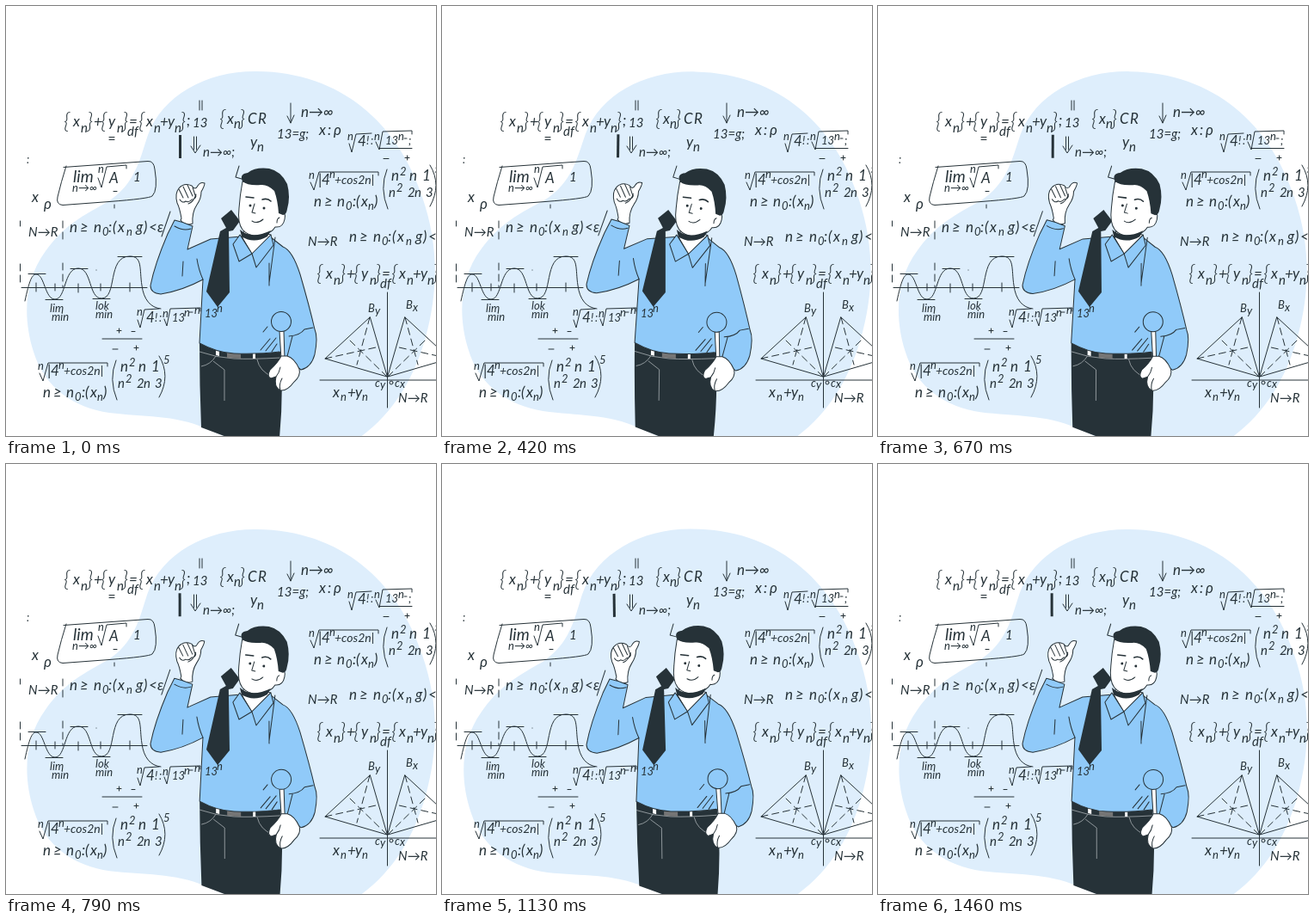
Write an HTML page that moves like this. It is 500 px wide and 500 px high and loops after 1500 ms.

```html
<!DOCTYPE html>
<html lang="en">
<head>
<meta charset="utf-8">
<title>Math teacher</title>
<style>
html, body { margin: 0; height: 100%; overflow: hidden; background: #fff; }
svg { display: block; width: 100vw; height: 100vh; }
.board { font: italic 17px Lato, "DejaVu Sans", sans-serif; fill: #263238; }
.board .m { font-size: 15px; }
.board .s { font-size: 13px; }
.board .xs { font-size: 11px; }
.board .b { font-size: 26px; font-weight: 300; }
.line, .board path { fill: none; stroke: #263238; stroke-linecap: round; stroke-linejoin: round; }
.board .dash { stroke-dasharray: 8 5; }
.skin, .shirt { fill: #fff; stroke: #263238; stroke-linejoin: round; }
.shirt { fill: #90caf9; }
.dark { fill: #263238; }
.seam { fill: none; stroke: #a9b0b3; stroke-width: .8; }
</style>
</head>
<body>
<svg viewBox="0 0 500 500">
  <path id="blob" fill="#deeefc" d="M292 76C235 75 182 103 165 150C155 180 150 207 118 228C82 247 64 260 46 285C20 320 20 365 32 402C45 445 80 467 120 473C160 478 195 475 232 491L262 504H408C448 477 474 435 488 385C503 330 503 277 484 222C456 137 390 77 292 76Z"/>

  <g id="man">
    <path class="dark" d="M225 392Q245 403 265 404Q295 405 319 402Q323 450 318 502H259L227 490Q225 440 225 392Z"/>
    <path class="seam" d="M225 402Q245 409 265 410T319 409M227 419Q238 417 244 407M241 413L254 423V459M292 411Q295 425 310 431"/>
    <path fill="#fff" d="M244 400l4 1v6l-4-1zM287 404h3v6h-3z"/>
    <path fill="#757575" d="M257 403l16 1v6l-16-1z"/>

    <path class="skin" d="M204 247Q202 235 199 229Q196 218 201 212Q207 205 216 209Q220 215 223 209Q226 204 231 206Q231 209 227 216Q227 224 222 231Q216 240 217 253Q208 256 203 249Z"/>
    <path class="line" d="M201 213l5 10M206 210l6 13M211 208l6 13M217 211l3 9M202 225q3 5 7 2q4 2 7-2q4 0 5-4M221 219q-3 9-9 11"/>
    <path class="skin" d="M277 258L274 276L286 290L308 266Z"/>
    <path class="shirt" d="M274 268L238 271L211 283L217 256Q206 251 196 249L188 265Q173 300 168 325Q168 334 180 335Q205 331 229 318L225 392Q245 403 265 404Q295 405 318 402L327 411L343 423Q355 420 359 405Q363 385 359 376Q353 350 342 312Q333 284 322 280L308 269L287 290Z"/>
    <path class="line" d="M196 256Q206 262 215 259M206 297L205 314M222 294Q224 307 229 318M329 384Q342 383 347 376L357 374M326 411L333 384M313 269L306 322M306 299V325M191 239L181 268M296 400L307 387M302 401L314 386M309 402L315 393M299 379l5-6"/>
    <path class="shirt" d="M272 266L264 277L271 297L286 288ZM308 266L286 288L291 304L311 278Z"/>
    <path class="dark" d="M262 237L272 250L264 261L259 262L260 333L246 350L233 332L249 262L256 258L250 247Z"/>

    <path class="skin" d="M275 204Q272 220 271 235Q269 252 275 260Q283 269 297 267Q309 264 313 257Q322 258 324 248Q326 239 320 240L315 205Z"/>
    <path class="dark" d="M272 260Q285 272 308 261L304 268Q288 277 274 268Z"/>
    <path class="dark" d="M275 204Q271 195 281 194Q290 187 306 189Q320 192 327 207Q331 222 327 236Q326 243 322 243L317 241Q316 226 312 215Q304 207 296 208Q281 209 275 204Z"/>
    <path class="line" stroke-width="1.6" d="M279 222l9 1M298 225q6-2 10 2"/>
    <path class="line" d="M289 230l-3 10l4 1M286 250Q292 254 299 248M318 246q-3 1-3 6M271 186L267 199L274 201"/>
    <circle class="dark" cx="284" cy="232" r="1.5"/>
    <circle class="dark" cx="300" cy="235" r="1.5"/>

    <path class="skin" d="M318 378h5l1 32h-4z"/>
    <circle class="shirt" cx="320" cy="367" r="11.5"/>
    <path class="skin" d="M320 407Q316 415 307 423Q303 431 308 433L314 431Q311 443 319 447Q327 448 335 437Q343 430 341 422Q335 409 327 407Z"/>
    <path class="line" d="M314 431Q318 426 319 420M319 447Q317 440 321 433"/>
    <path class="line" stroke-width="3" style="stroke-linecap:butt" d="M202.5 150V177"/>
  </g>

  <g class="board">
    <g id="sum">
      <text class="b" x="67 94 110 135 154 202" y="143">{}{}{}</text>
      <text x="78 102 119 143 163 179 188" y="140">x+y=x+y</text>
      <text class="m" x="87 129 172 196" y="147">nnnn</text>
      <text class="m" x="141" y="151">df</text>
    </g>
    <use href="#sum" x="294" y="177"/>
    <text x="210" y="139">;</text>
    <path d="M120 152.500h6M120 155.500h6M225 110v11M228 110v11"/>
    <text class="m" x="217" y="141">13</text>
    <path d="M218.500 152v15M221.500 152v15M215 163l5 8 6-9M331 113v23M327 128l4 8 4-9"/>
    <text class="m" x="229" y="175">n→∞;</text>
    <text class="b" x="248 271" y="140">{}</text>
    <text x="257 281 293" y="137">xCR</text>
    <text class="m" x="265" y="142">n</text>
    <text x="343" y="129">n→∞</text>
    <text class="m" x="315" y="154">13=g;</text>
    <text x="364 374 381" y="150">x:ρ</text>
    <text x="284" y="164">y</text><text class="m" x="292" y="169">n</text>

    <text class="s" x="397 428 456" y="156">nnn</text>
    <path d="M399 160l3 10 5-21 18-1M430 158l4 9 4-21 34-1v4M434 165.500h38"/>
    <text x="409" y="163">4</text><text class="s" x="419 424 468" y="161">!:;</text>
    <text class="s" x="441" y="161">13</text>
    <path d="M439 177.500h6M464 176.500h5M466.500 174v5M463 154h3"/>

    <text class="s" x="24" y="183">:</text>
    <path d="M67 187.500L165 180.500Q172 180 173 190Q177 214 170 221Q166 224 120 227.500L66 231.500Q58 231 60 222Q64 205 70 186"/>
    <text x="78" y="205" font-size="19">lim</text>
    <text class="s" x="107" y="194">n</text>
    <path d="M107 200l4 11 6-24 23-2v4M125 215.500h4"/>
    <text x="120" y="206">A</text><text class="m" x="148" y="204">1</text>
    <text class="s" x="77" y="216">n→∞</text>
    <text x="30 44" y="228 236">xρ</text>

    <g id="limit">
      <text id="map" class="m" x="26" y="268">N→R</text>
      <text x="74 86 102 119 124 130 151 160 166 176" y="263">n≥n:(xg)&lt;ε</text>
      <text class="s" x="112 140" y="267">0n</text>
    </g>
    <use href="#limit" x="325" y="11"/>
    <use href="#map" x="430" y="193"/>

    <path d="M18 327.500H164M22 343C27 320 30 312 35 312C45 312 45 341 57 341C70 341 67 305 84 305C100 305 96 340 111 340C130 340 117 291 144 291C159 291 155 306 158 325C160 341 168 351 180 352"/>
    <path d="M26 311.500h20M75 305.500h20M130 291.500h28M46 341.500h20M101 340.500h20M35 322v10M57 323v8M84 323v10M110 323v8M144 322v10M105 307v.1M126 231v4"/>
    <path class="dash" d="M16.500 250v6M16.500 300v22M66 250v22M66 299v28"/>
    <text class="s" x="51" y="356">lim</text><text class="s" x="53" y="366">min</text>
    <text class="s" x="104" y="353">lok</text><text class="s" x="104" y="363">min</text>
    <path d="M112 387h46M129 377.500h5M131.500 375v5M146 378.500h4M124 399h6M149 397.500h5M151.500 395v5"/>

    <text class="s" x="152 182 207 219 245" y="360 362 361 358 356">nnnnn</text>
    <path d="M153 365l3 9 5-21 17-1M184 364l3 8 4-20 35-1v4M213 356h4"/>
    <text x="163" y="368">4</text><text class="s" x="173 178" y="367">!:</text>
    <text class="s" x="193" y="367">13</text><text class="s" x="231" y="362">13</text>

    <g id="root">
      <text class="s" x="37 61" y="423 422">nn</text>
      <path d="M39 427l4 9 6-21 69 0v4M128 412Q119 434 129 458M178 407Q192 430 178 455"/>
      <text x="48 52" y="430">|4</text><text x="67" y="429" font-size="14">+cos2n|</text>
      <text x="43 55 70 88 92 98 113" y="455">n≥n:(x)</text>
      <text class="s" x="80 106" y="459">0n</text>
      <text x="133 154 169" y="425">nn1</text>
      <text class="m" x="130 152 160 173" y="444">n2n3</text>
      <text class="s" x="143 139 183" y="419 438 416">225</text>
    </g>
    <use href="#root" x="315" y="-222"/>

    <path d="M443.500 333V467M365 435H500"/>
    <g id="fan">
      <path d="M443 431L371 410L423 362Z"/>
      <path class="dash" d="M371 410L430 397M423 362L408 417M443 431L399 388"/>
    </g>
    <use href="#fan" transform="translate(887) scale(-1 1)"/>
    <path d="M450 438a2 2 0 1 1-4 0a2 2 0 1 1 4 0"/>
    <text class="s" x="421" y="356">B</text><text class="s" x="429" y="359">y</text>
    <text class="s" x="465" y="352">B</text><text class="s" x="473" y="355">x</text>
    <text class="s" x="429 435 452 458" y="443 445 443 444">cycx</text>
    <text x="380 397 406" y="455">x+y</text><text class="s" x="389 414" y="459">nn</text>
  </g>
</svg>
<script>
const period = 1500, swing = 0.8;
const blob = document.getElementById("blob");
const man = document.getElementById("man");

function frame() {
  const angle = swing * Math.sin(performance.now() / period * 2 * Math.PI);
  blob.setAttribute("transform", `rotate(${angle} 262 285)`);
  man.setAttribute("transform", `rotate(${angle} 265 325)`);
  requestAnimationFrame(frame);
}
frame();
</script>
</body>
</html>
```
